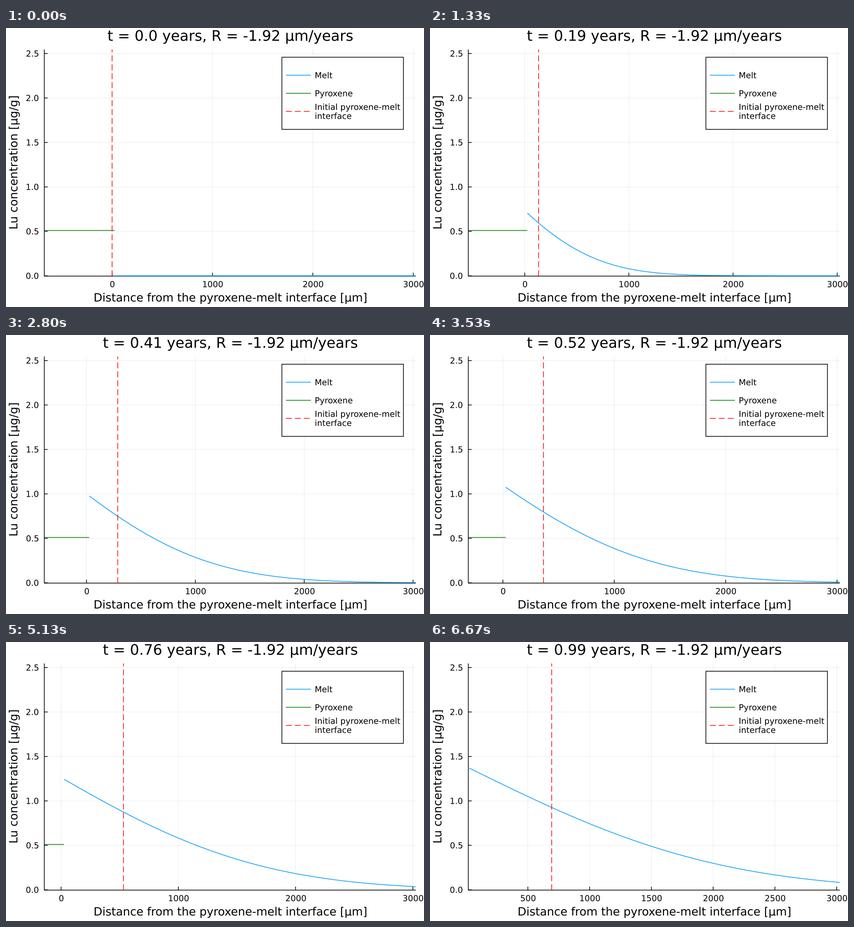
Write a matplotlib script that moves like this. It is 917 px wide and 611 px high and loops after 6.74 s.

```python
import math

import matplotlib.pyplot as plt
import numpy as np
from matplotlib.animation import FuncAnimation
from matplotlib.patches import PathPatch, Rectangle
from matplotlib.path import Path
from matplotlib.textpath import TextPath
from matplotlib.transforms import Affine2D

W, H, DPI = 917, 611, 100
FRAMES, LOOP = 101, 6740

# plot area in pixels, y pointing down
LEFT, RIGHT, TOP, BOTTOM = 84, 899, 47, 543.4
Y_ZERO, Y_UNIT = 542.7, 194.7

# diffusion away from a moving interface (micrometres, years)
SPEED, DIFF, RATIO = 700, 1.18e6, 2.525
SHIFT, X_MAX = 25, 3025
PYROXENE, GARNET_FACTOR, GARNET_LEN = 0.51, 1.11, 1650

MELT, GREEN, RED, BLUE = "#009afa", "#008000", "#ff0000", "#0000ff"
LINE = 1.5
DASH = (13, 6.6)
PT = 72 / DPI
SMALL, MEDIUM, LARGE = 18.2, 25, 31.85

plt.rcParams["font.family"] = "DejaVu Sans"
fig = plt.figure(figsize=(W / DPI, H / DPI), dpi=DPI, facecolor="white")
ax = fig.add_axes([0, 0, 1, 1])
ax.set_xlim(0, W)
ax.set_ylim(H, 0)
ax.axis("off")
erfc = np.vectorize(math.erfc, otypes=[float])


def melt(d, t):
    """Concentration at distance d from the interface after time t."""
    if t == 0:
        return np.zeros_like(d)
    spread = 2 * math.sqrt(DIFF * t)
    run = SPEED * t
    pe = SPEED * d / DIFF
    front = erfc((d - run) / spread) / 2
    pulse = math.sqrt(SPEED * run / (math.pi * DIFF)) * np.exp(-(((d - run) / spread) ** 2))
    back = (1 + pe + SPEED * run / DIFF) / 2 * np.exp(pe) * erfc((d + run) / spread)
    return RATIO * (front + pulse - back)


def ypx(c):
    return Y_ZERO - Y_UNIT * c


def line(xs, ys, color="black", width=LINE, dashed=False, clip=False, **kw):
    style = (0, tuple(v / width for v in DASH)) if dashed else "-"
    item = plt.Line2D(xs, ys, color=color, lw=width * PT, ls=style, snap=False,
                      dash_capstyle="butt", solid_capstyle="butt", **kw)
    ax.add_line(item)
    if clip:
        item.set_clip_path(Rectangle((LEFT, TOP), RIGHT - LEFT, BOTTOM + 0.8 - TOP,
                                     transform=ax.transData))
    return item


def text_path(x, y, text, size, align=0.5, upright=False):
    """Text on baseline y; align 0, 0.5 or 1 is the part of its width left of x."""
    path = TextPath((0, 0), text, size=size)
    verts = np.array(path.vertices)
    low, high = verts[:, 0].min(), verts[:, 0].max()
    u = verts[:, 0] - low - align * (high - low)
    v = verts[:, 1]
    pts = (x - v, y - u) if upright else (x + u, y - v)
    return Path(np.column_stack(pts), path.codes)


def label(*args, **kw):
    patch = PathPatch(text_path(*args, **kw), fc="black", lw=0, zorder=6)
    ax.add_artist(patch)
    return patch


def legend_row(i, color, texts):
    y = 103.4 + 39.6 * i
    items = [line([614, 669], [y, y], color, dashed=color == RED, zorder=6)]
    for j, text in enumerate(texts):
        base = y + 6.6 + 19.8 * (j - (len(texts) - 1) / 2)
        items.append(label(677.3, base, text, SMALL, 0))
    return items


# fixed parts
for i in range(6):
    y = ypx(i / 2)
    line([LEFT, RIGHT], [y, y], width=0.8, alpha=0.1, zorder=1)
    line([LEFT, LEFT + 7.5], [y, y], zorder=2)
    label(71, y + 6.6, str(i / 2), SMALL, 1)
line([LEFT, LEFT, RIGHT], [TOP, BOTTOM, BOTTOM], zorder=2)
label(491.3, 599, "Distance from the pyroxene-melt interface [µm]", MEDIUM)
label(25, 295.5, "Lu concentration [µg/g]", MEDIUM, upright=True)

frame = Rectangle((605.3, 64), 266.5, 158, fc="white", ec="black",
                  lw=LINE * PT, zorder=5, snap=False)
ax.add_artist(frame)
legend_row(0, MELT, ["Melt"])
legend_row(1, GREEN, ["Pyroxene"])
legend_row(2, RED, ["Initial pyroxene-melt", "interface"])

# moving parts
ticks = {v: (line([0, 0], [TOP, BOTTOM], width=0.8, alpha=0.1, zorder=1),
             line([0, 0], [BOTTOM, BOTTOM - 7.5], zorder=2),
             label(0, 567.6, str(v), SMALL))
         for v in range(0, X_MAX, 500)}
melt_line = line([], [], MELT, clip=True, zorder=3)
green_line = line([], [], GREEN, clip=True, zorder=3)
start_line = line([], [], RED, dashed=True, clip=True, zorder=4)
garnet_line = line([], [], BLUE, clip=True, zorder=4)
garnet = [garnet_line] + legend_row(3, BLUE, ["Garnet rim", "after crystallisation"])
title = label(491.5, 28, "t", LARGE)

melt_x = np.linspace(SHIFT, X_MAX, 160)
garnet_x = np.linspace(SHIFT + SPEED, SHIFT + SPEED + GARNET_LEN, 100)
garnet_y = ypx(GARNET_FACTOR * melt(garnet_x - SHIFT, 1))


def draw(k):
    t = k / 100
    final = k == FRAMES - 1
    x_min = SPEED * t - 675
    scale = (RIGHT - LEFT) / (X_MAX - x_min)

    def xpx(x):
        return LEFT + (x - x_min) * scale

    step = 1000 if x_min < 0 else 500
    for v, items in ticks.items():
        move = Affine2D().translate(xpx(v), 0) + ax.transData
        for item in items:
            item.set_visible(v >= x_min and v % step == 0)
            item.set_transform(move)

    melt_line.set_data(xpx(melt_x), ypx(melt(melt_x - SHIFT, t)))
    green_line.set_data([LEFT, xpx(SHIFT)], [ypx(PYROXENE)] * 2)
    green_line.set_visible(not final)
    start_line.set_data([xpx(SPEED * t)] * 2, [BOTTOM, TOP])
    garnet_line.set_data(xpx(garnet_x), garnet_y)
    for item in garnet:
        item.set_visible(final)
    frame.set_height(198 if final else 158)
    title.set_path(text_path(491.5, 28, f"t = {t} years, R = -1.92 µm/years", LARGE))
    return []


anim = FuncAnimation(fig, draw, frames=FRAMES, interval=LOOP / FRAMES,
                     repeat=True, repeat_delay=0)
plt.show()
```
